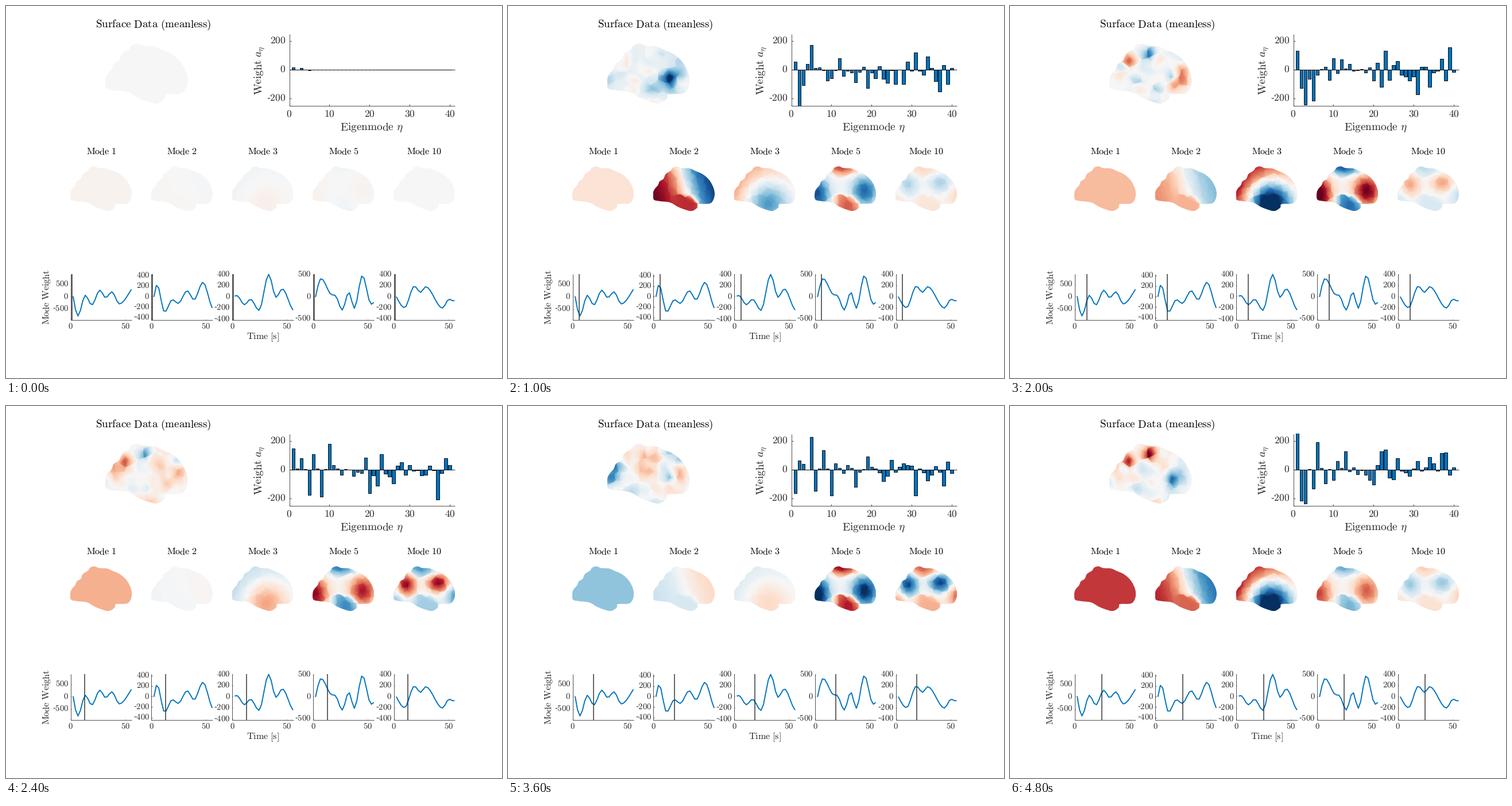
Write a matplotlib script that moves like this. It is 864x648 px and loops after 5 s.

```python
import numpy as np
import matplotlib.pyplot as plt
from matplotlib.animation import FuncAnimation
from matplotlib.patches import Polygon, Rectangle

plt.rcParams["mathtext.fontset"] = "cm"
plt.rcParams["text.hinting"] = "none"
FRAMES, INTERVAL = 25, 200
STEPS = np.arange(FRAMES)
INK, BLUE = "#262626", "#0072BD"
LIMIT = 410  # weight that saturates the colour scale for a unit field
rng = np.random.default_rng(12)


def curve(turns):
    """Ease from one turning point (step, value) to the next."""
    t, y = np.array(turns, float).T
    j = np.clip(np.searchsorted(t, STEPS, side="right") - 1, 0, len(t) - 2)
    f = (STEPS - t[j]) / (t[j + 1] - t[j])
    return y[j] + (y[j + 1] - y[j]) * f * f * (3 - 2 * f)


def wave(size):
    """Irregular oscillation that starts at rest."""
    return sum(rng.normal(0, size) * np.sin(rng.uniform(.4, 1.1) * STEPS)
               for _ in range(2))


SERIES = {
    1: curve([(-2, 800), (2, -770), (5, 55), (7.7, -335), (11, 260),
              (13.4, -40), (16, 192), (19, -290), (27, 560)]),
    2: curve([(-1.5, -300), (1.3, 235), (4.4, -300), (7.6, -57), (10, -130),
              (13.7, 115), (16.5, -62), (20.2, 278), (24.6, -245)]),
    3: curve([(-1, 0), (.9, 20), (4, -145), (6.5, -45), (10, -245),
              (14, 398), (17, -12), (19.6, 140), (24.5, -250)]),
    5: curve([(-1.8, -300), (2.3, 415), (6.8, 40), (8, 33), (11, -305),
              (13.7, 105), (16, -265), (19.3, 485), (22.9, -172),
              (24.5, -120)]),
    10: curve([(-3, 165), (3.4, -200), (7.4, 190), (10, 78), (12.1, 180),
               (19, -205), (21.7, -45), (23.5, -76), (25, -70)]),
}
WEIGHTS = np.array([SERIES[n] if n in SERIES else wave(110 - n)
                    for n in range(1, 41)])

# Brain outline: key points joined by a closed Catmull-Rom curve
KNOTS = np.array([
    (173, 127), (177, 118), (184, 110), (188, 101), (197, 95), (202, 84),
    (214, 76), (219, 69), (229, 66), (240, 70), (258, 71), (272, 77),
    (286, 83), (298, 92), (307, 103), (314, 118), (316, 132), (312, 146),
    (303, 153), (279, 154), (276, 162), (263, 170), (248, 167), (230, 160),
    (212, 150), (188, 147), (174, 143)])
HEIGHT = 104 / 143


def to_unit(x, y):
    return (x - 173) / 143, (y - 66) / 143


def smooth_closed(p, n=6):
    before, after, last = (np.roll(p, s, axis=0) for s in (1, -1, -2))
    f = np.arange(n)[:, None, None] / n
    q = p + f / 2 * (after - before
                     + f * (2 * before - 5 * p + 4 * after - last
                            + f * (3 * p - before - 3 * after + last)))
    return q.transpose(1, 0, 2).reshape(-1, 2)


OUTLINE = np.column_stack(to_unit(*smooth_closed(KNOTS).T))

# Pull points towards nearby cell centres, like gyri with sharp sulci
u, v = np.meshgrid(np.linspace(0, 1, 216), np.linspace(0, HEIGHT, 158))
seeds = rng.uniform((0, 0), (1, HEIGHT), (90, 2))
nearest = np.argmin([(u - a)**2 + (v - b)**2 for a, b in seeds], axis=0)
u = u + .35 * (seeds[nearest, 0] - u)
v = v + .35 * (seeds[nearest, 1] - v)


def bump(cu, cv, su, sv=None):
    return np.exp(-((u - cu) / su)**2 / 2 - ((v - cv) / (sv or su))**2 / 2)


def step(x, width=.015):
    return 1 / (1 + np.exp(-np.clip(x / width, -40, 40)))


temporal = (step(v - .45 - 1.1 * np.maximum(u - .45, 0)**1.7)
            * step(u - .32, .03) * step(.74 - u))
FIELDS = {
    1: np.ones_like(u),
    2: (1.55 * np.tanh(3 * (u - .42 - .3 * v)) * (1 - temporal)
        - 1.1 * temporal),
    3: 3.2 * bump(.53, .6, .27) - 1.9 + 1.2 * u + .3 * v,
    5: (-2.1 * bump(.04, .45, .14, .2) - 1.9 * bump(.82, .4, .15, .17)
        + 1.6 * bump(.45, .02, .2, .08)
        + temporal * (.5 + 1.1 * bump(.58, .62, .2))),
    10: (2.3 * bump(.21, .3, .11, .13) + 2.3 * bump(.73, .27, .13, .11)
         - 1.2 * bump(.45, .04, .18, .09) - 1.1 * bump(1, .48, .1, .12)
         - .8 * bump(.02, .58, .12) - .6 * temporal - .2),
}

# Surface activity: a few hot spots (x, y, size, turns) over drifting ripples
HOT_SPOTS = [
    (240, 85, .06, [(0, 0), (3, .5), (8, -.8), (14, -.55), (18, .4),
                    (24, .9)]),
    (206, 97, .055, [(0, 0), (3, -.2), (10, .45), (15, -.55), (24, .75)]),
    (280, 128, .065, [(0, 0), (3, -.7), (8, -.45), (15, .7), (18, -.3),
                      (24, -.4)]),
    (184, 122, .07, [(0, 0), (8, 0), (14, .25), (18, -.6), (24, .25)]),
    (250, 120, .3, [(0, 0), (3, -.2), (13, .1), (24, 0)]),
]
shapes = [bump(*to_unit(x, y), size) for x, y, size, _ in HOT_SPOTS]
strengths = [curve(turns) for *_, turns in HOT_SPOTS]
for _ in range(55):
    shapes.append(bump(rng.uniform(0, 1), rng.uniform(0, HEIGHT),
                       *rng.uniform(.03, .08, 2)))
    strengths.append(wave(.15))
SURFACES = np.tensordot(np.transpose(strengths), np.array(shapes), 1)


fig = plt.figure(figsize=(12, 9), dpi=72, facecolor="white")
ax = fig.add_axes([0, 0, 1, 1])
ax.set_axis_off()


def label(x, y, text, size, ha="center", **kw):
    text = str(text).replace("-", "\u2010").replace(" ", r"\ ")
    ax.text(x, y, rf"$\mathrm{{{text}}}$", size=size, ha=ha, va="baseline",
            color=kw.pop("color", INK), **kw)


def line(xs, ys, color=INK, lw=.8, **kw):
    return ax.plot(xs, ys, color=color, lw=lw, solid_capstyle="butt", **kw)[0]


def axes_lines(x0, x1, top, bottom, xticks, yticks, size, tick, gap, drop):
    """xticks and yticks are (pixel, label) pairs."""
    line([x0, x0, x1], [top, bottom, bottom])
    for x, text in xticks:
        line([x, x], [bottom, bottom - tick])
        label(x, bottom + drop, text, size)
    for y, text in yticks:
        line([x0, x0 + tick], [y, y])
        label(x0 - gap, y + .31 * size - .6, text, size, ha="right")


def brain(x, y, width):
    image = ax.imshow(np.zeros_like(u), cmap="RdBu_r", vmin=-1, vmax=1,
                      extent=(x, x + width, y + HEIGHT * width, y),
                      interpolation="bilinear", aspect="auto")
    image.set_clip_path(Polygon(OUTLINE * width + (x, y),
                                transform=ax.transData))
    return image


label(256.5, 37.8, "Surface Data (meanless)", 19.1, color="black")
surface = brain(173, 65.5, 143.5)

# Spectrum
ZERO, BAR_STEP = 110.5, 6.99
axes_lines(493.5, 781.5, 48.5, 173.5,
           [(493.5 + BAR_STEP * t, t) for t in range(0, 41, 10)],
           [(ZERO - t / 4, t) for t in (-200, 0, 200)], 17.5, 3, 6, 20)
label(637, 217, r"Eigenmode }\eta\mathrm{", 19.3)
label(446, 112, r"Weight }a_\eta\mathrm{", 19.2, rotation=90,
      rotation_mode="anchor")
window = Rectangle((493, 48), 289, 126, transform=ax.transData)
bars = ax.bar(493.5 + BAR_STEP * np.arange(1, 41), np.zeros(40),
              width=.8 * BAR_STEP, bottom=ZERO, color=BLUE,
              edgecolor="black", linewidth=.9)
for bar in bars:
    bar.set_clip_path(window)
line([493.5, 781.5], [ZERO, ZERO], "black", .8)

# Modes: brain above, time course below
SECOND, ORIGIN = 1.9, 506.3
TICKS = {1: (.0436, 500, 1), 2: (.0905, 200, 2), 3: (.0975, 200, 2),
         5: (.0765, 500, 1), 10: (.0965, 200, 2)}
modes, cursors = {}, []
for i, (mode, values) in enumerate(SERIES.items()):
    x0 = 112.7 + 140.75 * i
    label(x0 + 53, 259, f"Mode {mode}", 16.1, color="black")
    modes[mode] = brain(x0 - .5, 279.3, 107)
    scale, unit, count = TICKS[mode]
    axes_lines(x0, x0 + 106.3, 467, 546.7, [(x0, 0), (x0 + 50 * SECOND, 50)],
               [(ORIGIN - scale * unit * n, unit * n)
                for n in range(-count, count + 1)], 14.7, 1.2, 3.5, 16.2)
    line(x0 + 4.2 + 4.23 * STEPS, ORIGIN - scale * values, BLUE, 1.9)
    cursors.append((x0, line([x0, x0], [467, 546.7], lw=2, alpha=.7)))
label(76, 507, "Mode Weight", 16.1, rotation=90, rotation_mode="anchor")
label(447, 580.8, "Time [s]", 16.1)

ax.set_xlim(0, 864)
ax.set_ylim(648, 0)


def update(k):
    for bar, weight in zip(bars, WEIGHTS[:, k]):
        bar.set_height(-weight / 4)
    surface.set_data(SURFACES[k])
    for mode, image in modes.items():
        image.set_data(FIELDS[mode] * SERIES[mode][k] / LIMIT)
    for x0, cursor in cursors:
        x = x0 + SECOND * (k + 1)
        cursor.set_xdata([x, x])
    return [*bars, surface, *modes.values(), *(c for _, c in cursors)]


anim = FuncAnimation(fig, update, frames=FRAMES, interval=INTERVAL,
                     repeat=True, repeat_delay=0, blit=False)
plt.show()
```
